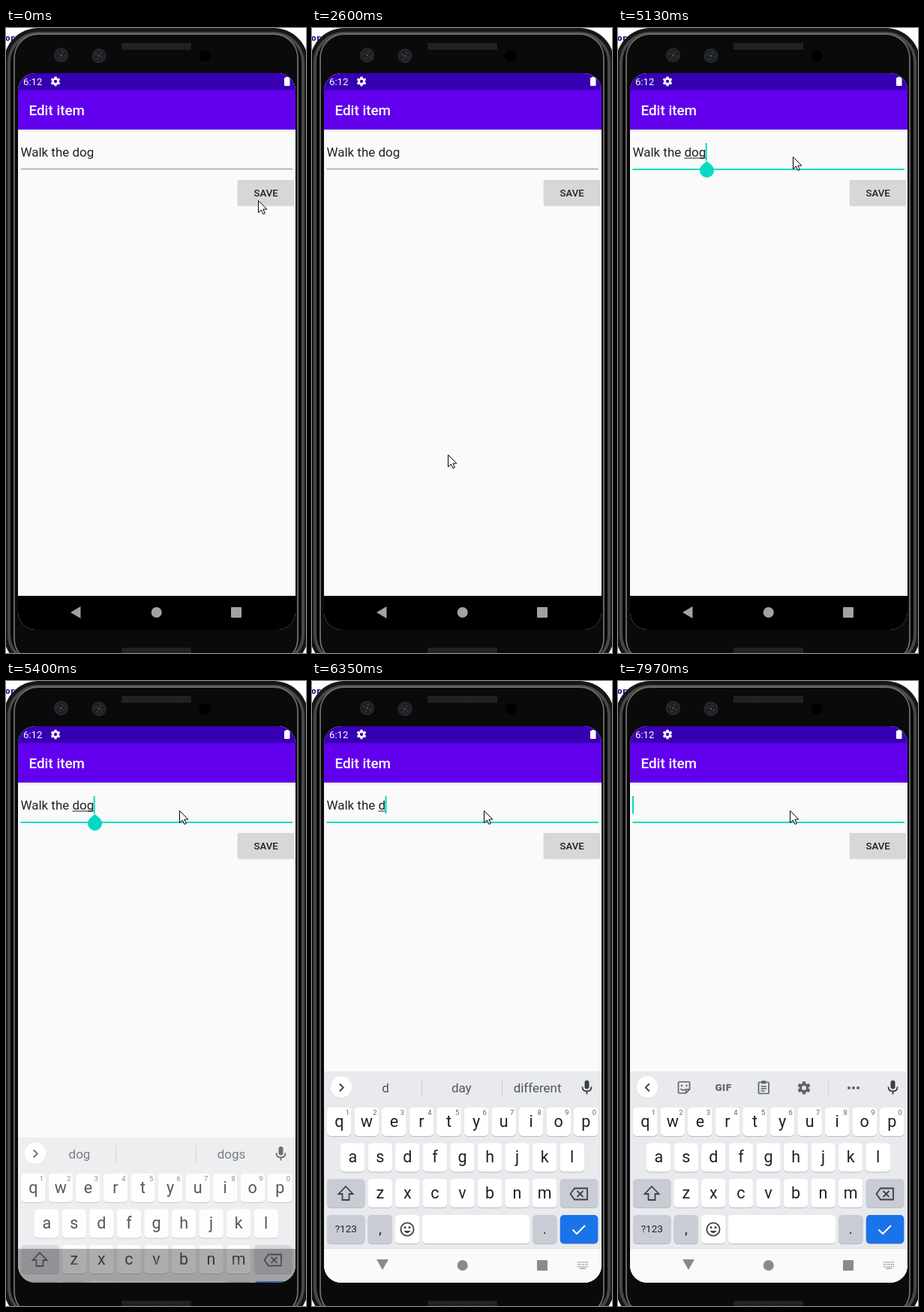
An HTML page for the animation above (8000 ms loop, 400 px wide and 831 px high).

```html
<!DOCTYPE html>
<html lang="en">
<head>
<meta charset="utf-8">
<title>Edit item</title>
<style>
html, body { margin: 0; width: 100%; height: 100%; overflow: hidden; background: #fff; }
svg { display: block; width: 400px; height: 831px; font-family: Roboto, sans-serif; }
text { white-space: pre; }
.mid { text-anchor: middle; }
.line { fill: none; stroke: #3c4043; stroke-width: 1.8; }
</style>
</head>
<body>
<svg id="stage" viewBox="0 0 400 831"></svg>
<script>
const TEAL = '#03dac5';
const rect = (x, y, w, h, fill, r = 0, more = '') =>
  `<rect x="${x}" y="${y}" width="${w}" height="${h}" fill="${fill}" rx="${r}" ${more}/>`;
const circle = (x, y, r, fill, more = '') =>
  `<circle cx="${x}" cy="${y}" r="${r}" fill="${fill}" ${more}/>`;
const text = (x, y, size, fill, s, more = '') =>
  `<text x="${x}" y="${y}" font-size="${size}" fill="${fill}" ${more}>${s}</text>`;
const path = (d, more = 'class="line"') => `<path d="${d}" ${more}/>`;
const MID = 'class="mid"';

function gear(x, y, r, fill, hole) {
  let s = circle(x, y, r * .74, fill);
  for (let a = 0; a < 180; a += 60)
    s += rect(x - r * .26, y - r, r * .52, r * 2, fill, .5, `transform="rotate(${a} ${x} ${y})"`);
  return s + circle(x, y, r * .34, hole);
}

function lens(x, y) {
  return circle(x, y, 9.7, '#24272b') + circle(x, y, 7, '#1a1d21') +
    circle(x, y, 4.6, 'none', 'stroke="#33373c" stroke-width="2" stroke-dasharray="4 3"') +
    circle(x, y, 1.5, '#4b5057');
}

const speaker = y => rect(154, y, 93, 9, '#262626', 1.5) + rect(154, y, 93, 9, 'url(#mesh)', 1.5);

// one nested outline of the phone body, d pixels inside its edge
const shell = (d, fill, more) => rect(d - 3, d, 406 - 2 * d, 852 - 2 * d, fill, 46 - d, more);

function key(x, y, w, label = '', fill = '#fff', size = 21.5) {
  return rect(x, y + 1, w, 38, '#b9bcc1', 5) + rect(x, y, w, 38, fill, 5) +
    text(x + w / 2, y + 19 + size * .32, size, '#202124', label, MID);
}

function keyboard() {
  const pitch = 36.56, w = 32.5, grey = '#c9ccd4';
  let s = rect(16, 519, 370, 282, '#e8eaed') + '<g id="strip"></g>';
  [['qwertyuiop', 20, 567], ['asdfghjkl', 38, 614.5], ['zxcvbnm', 74.5, 662]].forEach(([row, x0, y], r) =>
    [...row].forEach((c, i) => {
      const x = x0 + i * pitch;
      s += key(x, y, w, c);
      if (!r) s += text(x + 27.3, y + 10, 9.4, '#5f6368', (i + 1) % 10, MID);
    }));
  s += key(20, 662, 50.5, '', grey) + key(330.8, 662, 50.5, '', grey) +
    key(20, 710, 50.5, '?123', grey, 13.5) + key(74.5, 710, w, ',', grey, 19) + key(111, 710, w) +
    key(147, 710, 143, '') + key(294, 710, w, '.', grey, 19) + key(330.8, 710, 50.5, '', '#1a73e8');
  // shift, backspace, smiley, tick
  s += path('M45 672L54.5 682H49.5V690H40.5V682H35.5Z') +
    path('M350 674.5H367V689.5H350L344.5 682ZM353.5 678L361.5 686M361.5 678L353.5 686') +
    circle(127, 729, 8.6, 'none', 'class="line"') + circle(124, 726.5, 1.5, '#3c4043') +
    circle(130, 726.5, 1.5, '#3c4043') + path('M122.5 731Q127 737.5 131.5 731Z', 'fill="#3c4043"') +
    path('M347.5 729.5L353 735L364 724', 'fill="none" stroke="#fff" stroke-width="2"');
  return s + rect(16, 754, 370, 47, '#fafafa') + rect(16, 754, 370, 1, '#dfe1e4');
}

function strip(words) {
  const c = '#5f6368', out = `fill="none" stroke="${c}" stroke-width="1.7"`;
  let s = circle(39, 540.7, 14.3, '#d9dbde') + circle(39, 540, 14.2, '#fff') +
    path(words ? 'M36.8 535.5L41.8 540.5L36.8 545.5' : 'M41.8 535.5L36.8 540.5L41.8 545.5');
  if (words) {
    words.forEach((v, i) => s += text(98 + i * 101.3, 547, 17, '#50555b', v, MID));
    s += rect(146, 529, 1, 23, '#c3c6ca') + rect(253, 529, 1, 23, '#c3c6ca');
  } else {
    s += path('M82 533H94.5Q95.5 533 95.5 534V543L90.5 548H82Q80.5 548 80.5 546.5V534.5Q80.5 533 82 533M90.5 548V543H95.5M83.5 542Q86 545.5 89 543', out) +
      circle(85, 538, 1.2, c) + circle(91.5, 538, 1.2, c) +
      text(140.5, 545, 13.5, c, 'GIF', 'class="mid" font-weight="900" letter-spacing=".5"') +
      rect(187.5, 533.5, 13.5, 15, 'none', 1, out) + rect(191, 531.5, 6.5, 4, c, 1) +
      path('M190.5 539H198M190.5 542H198M190.5 545H195.5', out) +
      gear(248, 541, 8.5, c, '#e8eaed') + rect(280, 529, 1, 22, '#d0d3d7') +
      [308, 314, 320].map(x => circle(x, 541, 2, c)).join('');
  }
  return s + rect(363.5, 531, 6, 11.5, '#3c4043', 3) +
    path('M360.5 539.5Q360.5 545.5 366.5 545.5Q372.5 545.5 372.5 539.5M366.5 545.5V549.5');
}

const dots = [772, 775, 778].map(y =>
  [0, 1, 2, 3, 4, 5].map(i => rect(354 + i * 2.5, y, 1.5, 1.5, '#9a9a9a')).join('')).join('');

const stage = document.getElementById('stage');
stage.innerHTML = `<defs>
  <pattern id="mesh" width="3" height="3" patternUnits="userSpaceOnUse">${circle(1, 1, .8, '#101010')}</pattern>
  <linearGradient id="drop" x2="0" y2="1"><stop stop-color="#000" stop-opacity=".1"/><stop offset="1" stop-color="#000" stop-opacity="0"/></linearGradient>
  <clipPath id="screen">${rect(16, 60, 370, 740, '#000', 23)}</clipPath></defs>` +
  text(-1, 16.5, 11, '#000080', 'or', 'font-family="DejaVu Sans Mono, monospace" font-weight="bold"') +
  shell(0, '#161616') +
  shell(7, '#050505', 'stroke="#484848" stroke-width="4"') +
  shell(14, '#0a0a0a', 'stroke="#6e6e6e" stroke-width="1.8"').replace('y="14"', 'y="8"').replace('height="824"', 'height="836"') +
  lens(73.5, 36) + lens(124, 37) + circle(265, 37, 7.5, '#000') + speaker(20) + speaker(824) +
  '<g clip-path="url(#screen)">' +
  rect(16, 60, 370, 740, '#fafafa') + rect(16, 135, 370, 3, 'url(#drop)') +
  rect(16, 82, 370, 53, '#6200ee') + rect(16, 60, 370, 22.5, '#3700b3') +
  text(23, 76, 13.2, '#fff', '6:12') + gear(66, 71, 6.3, '#fff', '#3700b3') +
  rect(371, 66, 7.5, 11, '#fff', 1) + rect(373, 65, 3.5, 2, '#fff') +
  text(30.5, 116, 18.84, '#fff', 'Edit item', 'font-weight="500"') +
  rect(308.5, 202.5, 76, 34.5, '#dedede', 2) + rect(309, 202, 75, 34, '#d6d7d7', 2) +
  text(346.7, 224, 13.2, '#212121', 'SAVE', 'class="mid" font-weight="500"') +
  text(19.5, 171, 16.96, '#212121', '', 'id="entry"') +
  rect(0, 172.5, 0, 1, '#212121', 0, 'id="compose"') +
  rect(19.5, 187, 362.5, 1, '#8a8a8a', 0, 'id="under"') +
  rect(0, 153, 2, 23.5, TEAL, 0, 'id="caret"') +
  path('M118.5 177L125 182.5A9.5 9.5 0 1 1 112 182.5Z', `id="handle" fill="${TEAL}"`) +
  `<g id="keys">${keyboard()}</g>` + rect(16, 755, 370, 46, '#000', 0, 'id="nav"') +
  `<g id="icons">${path('', 'id="back"') + circle(200.7, 777, 7, 'inherit') + rect(300, 770, 14, 14, 'inherit', 1)}</g>` +
  `<g id="switch">${dots + rect(357, 780.5, 8, 1.3, '#9a9a9a')}</g></g>` +
  path('M.5 .5V16.5L4.3 13L7 18.5L9.4 17.4L6.8 12H11.8Z', 'id="mouse" fill="#fff" stroke="#000"');

const el = {};
stage.querySelectorAll('[id]').forEach(e => el[e.id] = e);
const set = (e, attrs) => { for (const k in attrs) e.setAttribute(k, attrs[k]); };

// time, x, y
const MOUSE = [
  [0, 336, 229], [150, 344, 223], [280, 357, 213], [410, 360, 207], [540, 348, 200],
  [670, 318, 189], [800, 282, 178], [930, 253, 171], [1050, 242, 170], [1480, 241, 171],
  [1760, 252, 190], [1900, 276, 250], [2040, 289, 325], [2180, 272, 410], [2320, 241, 480],
  [2470, 210, 528], [2600, 181, 567], [2750, 157, 629], [3000, 205, 480], [3120, 285, 253],
  [3240, 283, 254], [3520, 222, 430], [3670, 152, 583], [3950, 158, 568], [4080, 205, 460],
  [4200, 285, 305], [4320, 320, 239], [4440, 297, 201], [4700, 250, 169], [4850, 237, 170],
  [5130, 233, 171], [5270, 231, 172], [5520, 229, 172]];

// time, field text, suggestions
const TYPED = [
  [0, 'Walk the dog', ['dog', '', 'dogs']],
  [6080, 'Walk the do', ['do', 'dog', 'does']],
  [6230, 'Walk the d', ['d', 'day', 'different']],
  [6380, 'Walk the ', ['first', 'same', 'best']],
  [6530, 'Walk the', ['the', 'they', 'them']],
  [6660, 'Walk th', ['the', 'this', 'that']],
  [6800, 'Walk t', ['to', 'the', 'this']],
  [6930, 'Walk ', ['to', 'the', 'this']],
  [7050, 'Walk ', ['to', 'in', 'with']],
  [7200, 'Walk', ['Walk', '', 'walking']],
  [7380, 'Wal', ['Wal', 'Walk', 'Wall']],
  [7570, 'Wa', ['Was', 'Want', 'Way']],
  [7850, 'W', ['We', 'What', 'When']],
  [7970, '', null]];

// time, keyboard drop, keyboard opacity, dark bar opacity, icon opacity
const SLIDE = [[0, 300, 0, 1, 1], [5270, 210, .4, .75, .7], [5400, 88, .75, .32, .22], [5520, 0, 1, 0, 1]];

const at = (list, t) => list.findLast(k => k[0] <= t);
const pen = document.createElement('canvas').getContext('2d');
const width = s => { pen.font = '16.96px Roboto, sans-serif'; return pen.measureText(s).width; };

let shown;
function draw(t) {
  const [, mx, my] = at(MOUSE, t), entry = at(TYPED, t), [, drop, alpha, dark, icon] = at(SLIDE, t);
  const [, s, words] = entry, focus = t >= 4980, edit = t >= 5130, light = t >= 5520;
  set(el.mouse, { transform: `translate(${mx} ${my})` });
  if (entry !== shown) {
    shown = entry;
    el.entry.textContent = s;
    el.strip.innerHTML = strip(words);
  }
  const start = width(s.slice(0, s.lastIndexOf(' ') + 1)), end = width(s);
  set(el.compose, { x: 19.5 + start, width: edit ? end - start : 0 });
  set(el.caret, { x: 19 + end, opacity: edit && !(t >= 5800 && t < 6080) ? 1 : 0 });
  set(el.handle, { opacity: edit && t < 6080 ? 1 : 0 });
  set(el.under, { height: focus ? 2 : 1, fill: focus ? TEAL : '#8a8a8a' });
  set(el.keys, { transform: `translate(0 ${drop})`, opacity: alpha });
  set(el.nav, { opacity: dark });
  set(el.icons, { fill: light ? '#8a8a8a' : '#a2a2a2', opacity: icon });
  set(el.back, { d: light ? 'M86 769H102L94 783Z' : 'M86 777L99.5 769V785Z' });
  set(el.switch, { opacity: light ? 1 : t >= 5400 ? .5 : 0 });
}

function loop(now) {
  draw(now % 8000);
  requestAnimationFrame(loop);
}
draw(0);
requestAnimationFrame(loop);
</script>
</body>
</html>
```
